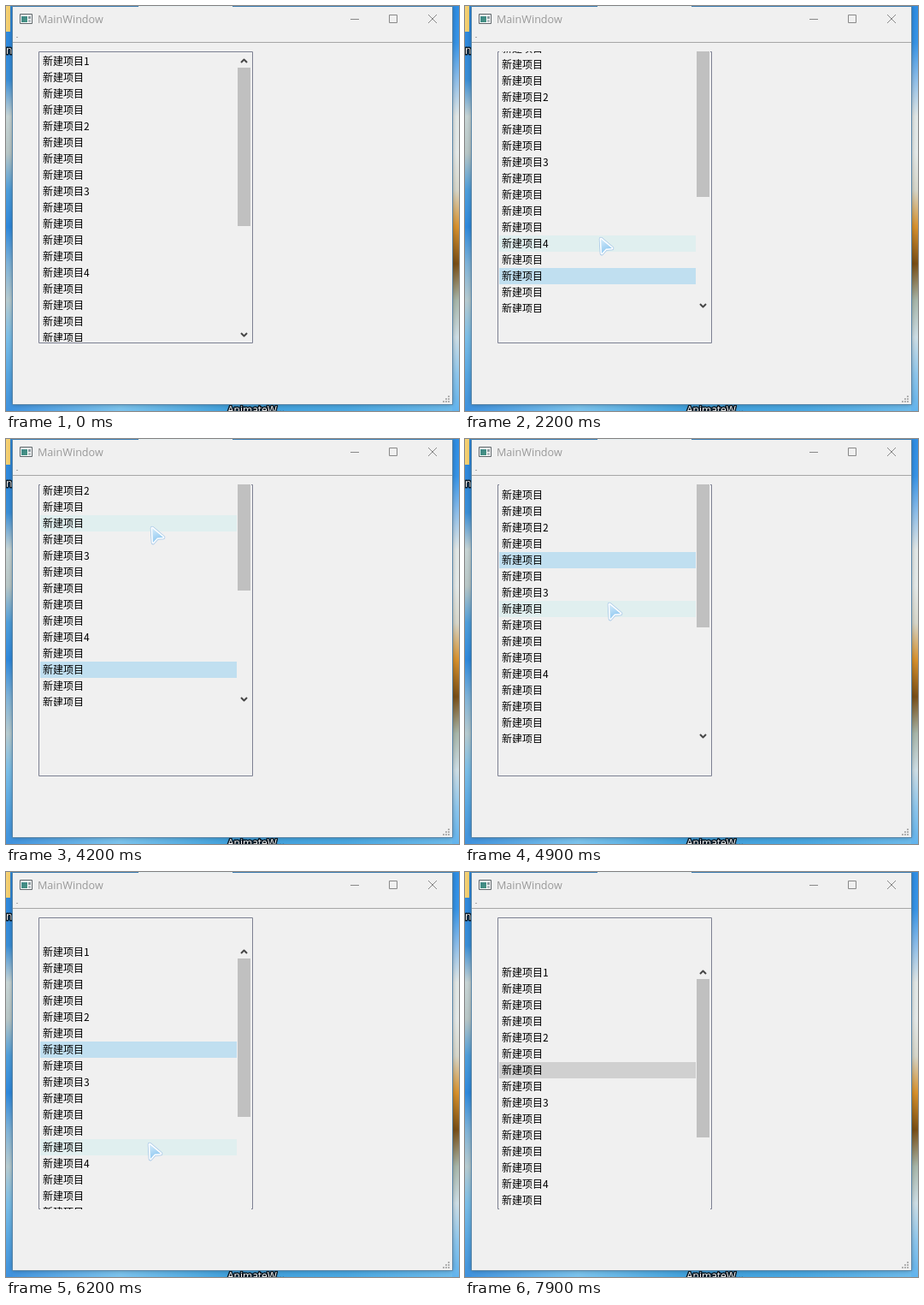
An HTML page with a canvas for the animation above (9100 ms loop, 530 by 473 pixels).

```html
<!DOCTYPE html>
<html lang="zh">
<head>
<meta charset="utf-8">
<title>MainWindow</title>
<style>
html, body { margin: 0; width: 100%; height: 100%; overflow: hidden; }
canvas { display: block; }
</style>
</head>
<body>
<canvas id="stage" width="530" height="473"></canvas>
<script>
const ctx = document.getElementById('stage').getContext('2d');
const LOOP = 9100, STEP = 100, ROW = 19, TOP = 55, ROWS = 18;
const SHOW = 100, FIRST_PRESS = 1400, SECOND_PRESS = 4300, LEAVE = 7900;
const headings = [0, 4, 8, 13];
const uiFont = '"Open Sans", "Noto Sans", sans-serif';
const listFont = '12px "Noto Sans CJK SC", "Noto Sans CJK", sans-serif';

// each move glides on from where the one before it ended
const home = { x: 457, y: 447, offset: 0 };
const moves = [
  { from: 200, to: 400, x: 190, y: 310, offset: 0 },
  { from: 500, to: 1400, x: 157, y: 336, offset: 0 },
  { from: 1450, to: 3500, x: 157, y: 180, offset: -80 },
  { from: 3700, to: 4000, x: 169, y: 102, offset: -80 },
  { from: 4250, to: 5500, x: 165, y: 254, offset: -7 },
  { from: 5500, to: 6900, x: 167, y: 363, offset: 56 },
  { from: 6900, to: 7400, x: 168, y: 377, offset: 53 },
  { from: 7600, to: 7900, x: 457, y: 447, offset: 53 }
];

function pose(t) {
  const p = { ...home };
  for (const m of moves) {
    const k = Math.min(1, Math.max(0, (t - m.from) / (m.to - m.from)));
    const eased = 1 - (1 - k) ** 1.2;
    for (const key in p) p[key] += (m[key] - p[key]) * eased;
  }
  for (const key in p) p[key] = Math.round(p[key]);
  return p;
}

function box(color, x, y, w, h) {
  ctx.fillStyle = color;
  ctx.fillRect(x, y, w, h);
}

function frame(color, x, y, w, h) {
  ctx.strokeStyle = color;
  ctx.lineWidth = 1;
  ctx.strokeRect(x + .5, y + .5, w - 1, h - 1);
}

function path(points, color, width) {
  ctx.beginPath();
  points.forEach(([x, y]) => ctx.lineTo(x, y));
  ctx.strokeStyle = color;
  ctx.lineWidth = width;
  ctx.stroke();
}

function text(s, x, y, color, font) {
  ctx.font = font;
  ctx.fillStyle = color;
  ctx.fillText(s, x, y);
}

// evenly spaced colours from the origin to (x, y)
function gradient(x, y, colors) {
  const g = ctx.createLinearGradient(0, 0, x, y);
  colors.split(' ').forEach((c, i, all) => g.addColorStop(i / (all.length - 1), c));
  return g;
}

function iconLabel(s, x, y) {
  ctx.font = '12px ' + uiFont;
  ctx.strokeStyle = '#0b1a26';
  ctx.lineWidth = 3;
  ctx.lineJoin = 'round';
  ctx.strokeText(s, x, y);
  text(s, x, y, '#fff', ctx.font);
}

function drawDesktop() {
  box(gradient(530, 0, '#3f92de #7cc4ee #3fa0dc #4aa8e2 #6fbcec'), 0, 0, 530, 473);
  box(gradient(0, 473, '#2f8ade #2f8ade #3a8fd8 #c9d6d6 #b9c8c8 #4f9fdc #2f8ade #7fb4da #b8cdd2 #7cc0ea #58a8e4 #3f92de'),
    0, 0, 8, 473);
  box(gradient(0, 473, '#2f8fe6 #3795e8 #8fc0ec #e3e9e8 #e6ebea #d8d8cc #d9922c #7a4f16 #a9b8ac #cfe0e8 #8fc8ee #62b4ee'),
    522, 0, 8, 473);
  box('#f7d272', 0, 0, 5, 30);
  iconLabel('n', 0, 56);
  iconLabel('AnimateW...', 259, 476);
}

function drawWindow() {
  ctx.save();
  ctx.shadowColor = 'rgba(0,0,0,.4)';
  ctx.shadowBlur = 6;
  box('#f0f0f0', 8, 0, 514, 465);
  ctx.restore();
  frame('#5b87a8', 7, 0, 516, 466);
  box('#3c7cb0', 8, 0, 514, 1);
  box('#e6eef0', 155, 0, 110, 1);
  frame('#5c6468', 16, 9, 15, 12);
  box('#fff', 17, 11, 13, 9);
  box(gradient(30, 30, '#2f6f96 #4fa07a'), 18, 12, 7, 7);
  box('#8a9aa0', 26, 12, 3, 3);
  box('#b4bec2', 26, 16, 3, 3);
  text('MainWindow', 37, 20, '#999', '12.6px ' + uiFont);
  box('#888', 403, 15, 10, 1);
  frame('#888', 448, 10, 10, 10);
  path([[494, 10], [504, 20]], '#888', 1);
  path([[504, 10], [494, 20]], '#888', 1);
  box('#a8a8a8', 12, 36, 2, 1);
  box('#a6a6a6', 8, 42, 514, 1);
  for (let r = 0; r < 3; r++)
    for (let c = 0; c <= r; c++) box('#b0b0b0', 517 - c * 3, 455 + r * 3, 2, 2);
}

function chevron(y, dir) {
  path([[275, y + 2 * dir], [278.5, y - 1.5 * dir], [282, y + 2 * dir]], '#484848', 2);
}

function drawList(offset, selected, hover, active) {
  frame('#7c8092', 38, 53, 251, 341);
  ctx.save();
  ctx.beginPath();
  ctx.rect(38, 53, 251, 341);
  ctx.clip();
  ctx.translate(0, offset);
  ctx.beginPath();
  ctx.rect(40, 54, 247, 338);
  ctx.clip();
  box('#f0f0f0', 40, 54, 247, 338);
  for (let i = 0; i < ROWS; i++) {
    const y = TOP + i * ROW;
    if (i === selected) box(active ? '#c0dff0' : '#d0d0d0', 40, y, 230, ROW);
    else if (i === hover) box('#e0efef', 40, y, 230, ROW);
    const number = headings.indexOf(i) + 1;
    text('新建项目' + (number || ''), 43, y + 14, '#000', listFont);
  }
  box('#c0c0c0', 271, 72, 15, 185);
  chevron(64, 1);
  chevron(384, -1);
  ctx.restore();
}

function drawPointer(x, y) {
  const shape = [[0, 0], [13, 11], [6, 11.5], [1, 17], [0, 0], [13, 11]];
  ctx.save();
  ctx.translate(x + 2, y + 2);
  ctx.lineJoin = 'round';
  path(shape, '#a4c6e6', 4.5);
  path(shape, '#fff', 3);
  ctx.fillStyle = gradient(8, 16, '#d6ecfa #8cc6f0');
  ctx.fill();
  ctx.restore();
}

function draw(now) {
  const t = Math.floor(now % LOOP / STEP) * STEP;
  const { x, y, offset } = pose(t);
  const active = t < LEAVE;
  const pointer = t >= SHOW && active;
  const selected = t < FIRST_PRESS ? -1 : t < SECOND_PRESS ? 15 : 6;
  const inside = pointer && x >= 40 && x < 270 && y < 392;
  const hover = inside ? Math.floor((y - TOP - offset) / ROW) : -1;
  drawDesktop();
  drawWindow();
  drawList(offset, selected, hover, active);
  if (pointer) drawPointer(x, y);
}

const start = performance.now();
function tick() {
  draw(performance.now() - start);
  requestAnimationFrame(tick);
}
tick();
</script>
</body>
</html>
```
